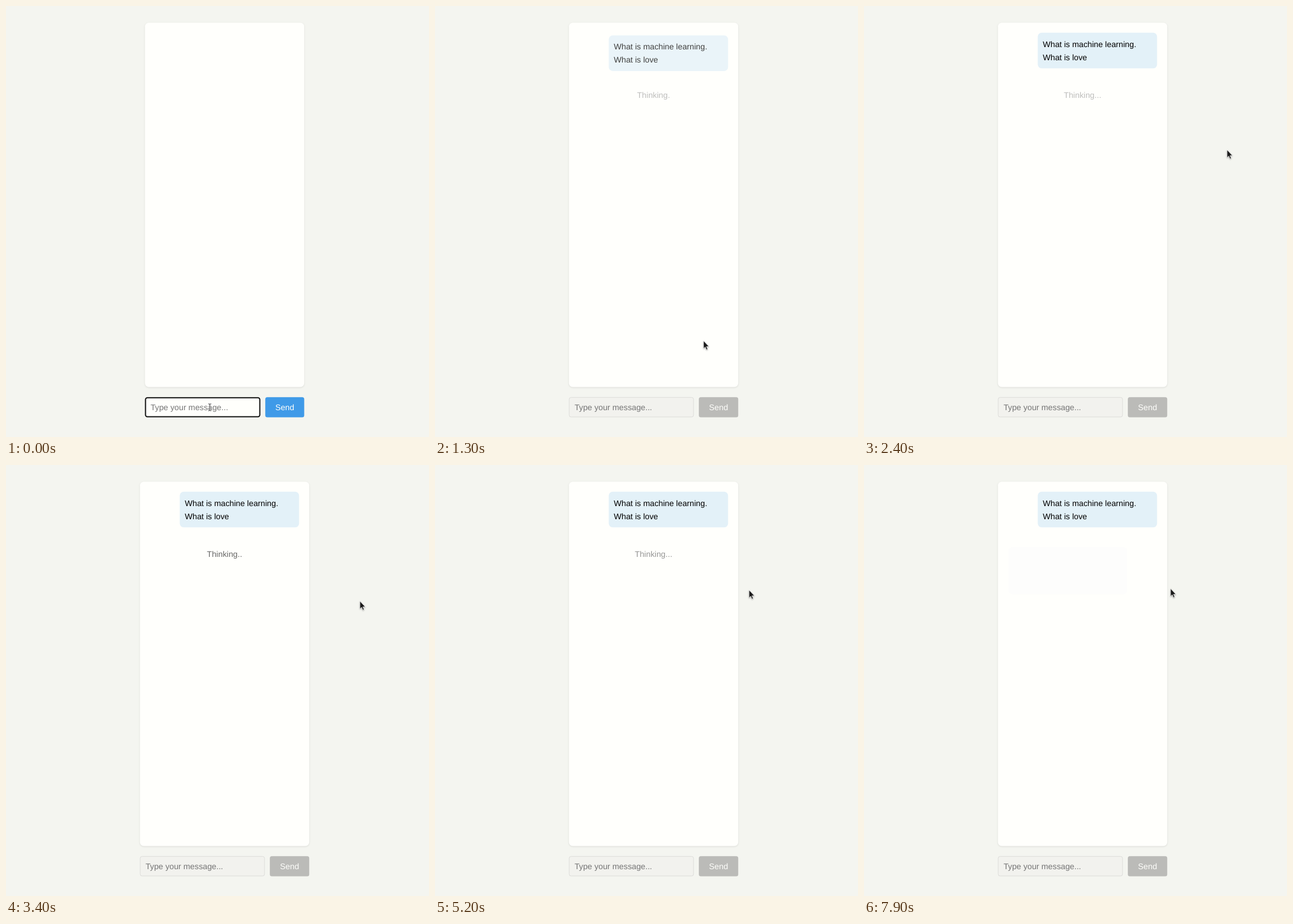
Recreate the animation shown at these times as an HTML page. Size 741 px wide and 755 px high, loop 8000 ms.

```html
<!DOCTYPE html>
<html lang="en">
<head>
<meta charset="utf-8">
<title>Chat</title>
<style>
  html, body { margin: 0; height: 100%; overflow: hidden; background: #f4f5f0; }
  svg { display: block; width: 741px; height: 755px; }
  text { font: 14.22px "Liberation Sans", Arial, sans-serif; text-rendering: geometricPrecision; white-space: pre; }
  #card { filter: drop-shadow(0 1.8px 1.8px rgba(0, 0, 0, .1)); }
  .cursor { filter: drop-shadow(.5px 1px .8px rgba(0, 0, 0, .35)); }
</style>
</head>
<body>
<svg viewBox="0 0 741 755">
  <defs>
    <clipPath id="field"><rect x="253" y="686" width="183" height="34"/></clipPath>
  </defs>
  <rect id="card" y="29.2" height="638.4" rx="7" fill="#fffffc"/>

  <g id="question">
    <rect x="304.4" y="46.8" width="209" height="62.5" rx="7" fill="#e3f1f8"/>
    <text x="313.3" y="71.7">What is machine learning.</text>
    <text x="313.3" y="94.5">What is love</text>
  </g>
  <text id="thinking" x="382.8" y="160.8" text-anchor="middle" fill="#666"></text>
  <rect id="answer" x="252.8" y="144" width="208.5" height="82.5" rx="7" fill="#fdfdfc"/>

  <rect id="input" rx="3.2"/>
  <text id="placeholder" y="707.6" fill="#757575">Type your message...</text>
  <g clip-path="url(#field)"><text id="typed" y="707.6">What is machine learning. What is love</text></g>
  <rect id="button" y="685.2" height="35.2" rx="3.5"/>
  <text id="send" y="707.6" text-anchor="middle" fill="#fffffc">Send</text>

  <g id="ibeam" fill="none">
    <path d="M-2.5-6H-.8L0-5.2.8-6H2.5M0-5.2V5.2M-2.5 6H-.8L0 5.2.8 6H2.5" stroke="#fff" stroke-width="2.4"/>
    <path d="M-2.5-6H-.8L0-5.2.8-6H2.5M0-5.2V5.2M-2.5 6H-.8L0 5.2.8 6H2.5" stroke="#222"/>
  </g>
  <path id="hand" class="cursor" fill="#fff" stroke="#222" stroke-width=".9" stroke-linejoin="round"
    d="M-1.3 0Q0-1.4 1.3 0V5Q2.6 4 3.6 5.3Q5 4.5 5.9 5.9Q7.7 5.3 8 7V10.5L6.6 13.2V15.6H-1.2V13.6L-5 9Q-5.4 6.8-3.2 7.3L-1.3 9Z"/>
  <path id="arrow" class="cursor" fill="#1a1a1a" stroke="#fff" stroke-width=".7"
    d="M0 0V13.6L3 10.8L5.1 15.7L7.3 14.7L5.2 10H9.4Z"/>
</svg>
<script>
const LOOP = 8000, PASTE = 300, PRESS = 900, SENT = 1100, REPLY = 7900;
const el = id => document.getElementById(id);
const set = (id, attrs) => {
  for (const name in attrs) el(id).setAttribute(name, attrs[name]);
};
const show = (id, visible) => set(id, { visibility: visible ? "visible" : "hidden" });
const clamp = v => Math.min(1, Math.max(0, v));
const smooth = p => p * p * (3 - 2 * p);

// Pointer hotspot: [time, x, y]
const path = [
  [0, 357, 703], [400, 357, 703], [800, 488, 701.5], [1100, 488, 701.5],
  [1600, 444, 414], [1900, 482, 371], [2400, 636, 252], [2700, 636, 252],
  [3400, 620, 238.5], [3600, 619, 238], [4400, 598, 228.5], [4500, 596, 228],
  [5400, 537, 216.5], [LOOP, 537, 216.5]
];

function pointerAt(t) {
  const i = path.findIndex(key => key[0] > t);
  const [t0, x0, y0] = path[i - 1], [t1, x1, y1] = path[i];
  const p = (t - t0) / (t1 - t0);
  return [x0 + (x1 - x0) * p, y0 + (y1 - y0) * p];
}

function drawForm(t, x) {
  const sent = t >= SENT, focused = t < PRESS, filled = t >= PASTE && !sent;
  const left = sent ? 234.6 : 243.4, right = sent ? 531.2 : 522.4;
  const inputWidth = sent ? 218.8 : 202.2, buttonWidth = sent ? 69 : 68.2;
  const line = focused ? 2 : 1;

  set("card", { x: left, width: right - left });
  set("input", {
    x: left + line / 2, y: 685.2 + line / 2,
    width: inputWidth - line, height: 35.2 - line,
    fill: sent ? "#f2f2ee" : "#fffffc",
    stroke: focused ? "#101010" : "#dcdcd9", "stroke-width": line
  });
  set("placeholder", { x: left + 9.8 });
  show("placeholder", !filled);
  show("typed", filled);
  set("typed", focused ? { x: 435.5, "text-anchor": "end" } : { x: 253.2, "text-anchor": "start" });
  set("button", {
    x: right - buttonWidth, width: buttonWidth,
    fill: sent ? "#bbbbb8" : x > 454 ? "#2d75c8" : "#3f9ae8"
  });
  set("send", { x: right - buttonWidth / 2 });
}

function drawMessages(t) {
  const entry = smooth(clamp((t - SENT) / 300));
  set("question", { opacity: entry, transform: `translate(0 ${17.8 * (1 - entry)})` });

  const waited = t - SENT, waiting = waited >= 0 && t < REPLY;
  show("thinking", waiting);
  show("answer", t >= REPLY);
  if (waiting) {
    const pulse = 1 - Math.abs(waited % 1500 / 750 - 1);
    set("thinking", { opacity: 0.3 + 0.7 * smooth(pulse) });
    el("thinking").textContent = "Thinking" + ".".repeat(1 + Math.floor(waited / 500) % 3);
  }
}

function drawPointer(t, x, y) {
  const shape = t >= SENT ? "arrow" : x > 446 ? "hand" : "ibeam";
  for (const id of ["ibeam", "hand", "arrow"]) show(id, id === shape);
  set(shape, { transform: `translate(${x} ${y})` });
}

function frame(now) {
  const t = Math.floor(now % LOOP / 100) * 100;
  const [x, y] = pointerAt(t);
  drawForm(t, x);
  drawMessages(t);
  drawPointer(t, x, y);
  requestAnimationFrame(frame);
}
frame(0);
</script>
</body>
</html>
```
